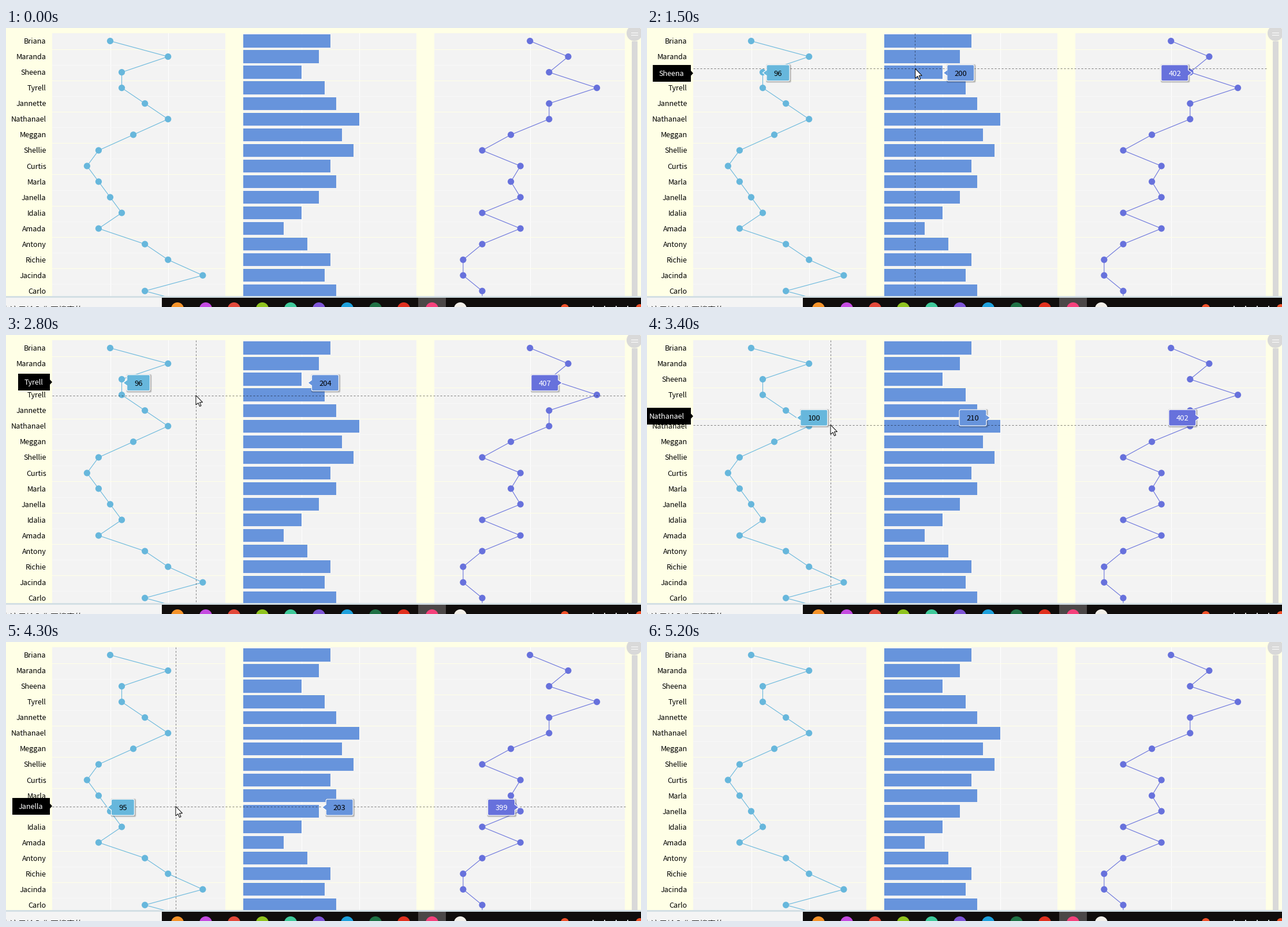
A matplotlib script for the animation above (5700 ms loop, 1100 px wide and 483 px high).

```python
import numpy as np
import matplotlib.pyplot as plt
from matplotlib.animation import FuncAnimation
from matplotlib.patches import Circle, FancyBboxPatch, Polygon, Rectangle

W, H, DPI = 1100, 483, 100
STEP, FRAMES = 100, 57
PX = 72 / DPI
TOP, BOTTOM, ROW = 9, 464, 27.05
FONT = "Noto Sans CJK JP"
CREAM = "#ffffe6"

NAMES = ("Briana Maranda Sheena Tyrell Jannette Nathanael Meggan Shellie Curtis "
         "Marla Janella Idalia Amada Antony Richie Jacinda Carlo").split()


class Panel:
    """One chart column: values grow rightwards from a base value."""

    def __init__(self, index, width, base, unit, grid, color, ink, offsets):
        self.x0 = 80 + 331 * index
        self.x1 = self.x0 + width
        self.color, self.ink = color, ink
        self.values = base + np.array(offsets)
        self.xs = self.x0 + 0.2 + unit * np.array(offsets)
        self.grid = np.arange(self.x0 + grid * unit, self.x1 - 50, grid * unit)


PANELS = (
    Panel(0, 300, 90, 20.05, 5, "#67b7dc", "black",
          [5, 10, 6, 6, 8, 10, 7, 4, 3, 4, 5, 6, 4, 8, 10, 13, 8, 13]),
    Panel(1, 300, 190, 10.04, 10, "#6794dc", "black",
          [15, 13, 10, 14, 16, 20, 17, 19, 15, 16, 13, 10, 7, 11, 15, 14, 16, 16]),
    Panel(2, 330, 390, 16.55, 10, "#6771dc", "white",
          [10, 14, 12, 17, 12, 12, 8, 5, 9, 8, 9, 5, 9, 5, 3, 3, 5, 5]),
)
YS = 22.5 + ROW * np.arange(len(NAMES) + 1)

# Key points of the pointer: time in ms, x, y
PATH = np.array([
    (100, 1084, 113), (900, 593, 107), (2000, 356, 39), (2100, 356, 39),
    (2750, 334, 85), (2800, 328, 104), (3220, 323, 112), (3300, 319, 150),
    (3400, 317, 155), (4150, 296, 282), (4300, 293, 284), (5000, 530, 200)])
SHOW_AT, HIDE_AT = 100, 5100

fig = plt.figure(figsize=(W / DPI, H / DPI), dpi=DPI, facecolor=CREAM)
ax = fig.add_axes([0, 0, 1, 1])
ax.set_xlim(0, W)
ax.set_ylim(H, 0)
ax.axis("off")


def rect(x0, y0, x1, y1, color, z=1):
    return ax.add_patch(Rectangle((x0, y0), x1 - x0, y1 - y0, fc=color, lw=0, zorder=z))


def disc(x, y, r, color, z=1):
    return ax.add_patch(Circle((x, y), r, fc=color, lw=0, zorder=z))


def line(x, y, color, z=2, width=1, **kw):
    return ax.plot(x, y, color=color, lw=width * PX, zorder=z, **kw)[0]


def label(x, y, text, color="black", ha="right", z=4, size=12.6):
    return ax.text(x, y + 4.6, text, color=color, ha=ha, va="baseline",
                   family=FONT, fontsize=size * PX, zorder=z)


def draw_chart():
    for panel in PANELS:
        rect(panel.x0, TOP, panel.x1, BOTTOM, "#f3f3f3")
        for x in np.floor(panel.grid) + 0.5:
            line([x, x], [TOP, BOTTOM], "white")
        for k in range(1, 17):
            y = round(TOP + ROW * k) + 0.5
            line([panel.x0, panel.x1], [y, y], CREAM if k % 2 else "#f8f8f8")
    left, bars, right = PANELS
    for x, y in zip(np.round(bars.xs), YS):
        rect(bars.x0, y - 11.2, x, y + 11.2, bars.color, 3)
    for panel in (left, right):
        line(panel.xs, YS, panel.color, 3, 1.1)
        for x, y in zip(panel.xs, YS):
            disc(x, y, 5.6, panel.color, 3)
    rect(1084, 23, 1094, BOTTOM, "#d9d9d9")
    disc(1088.5, 9, 13.5, "#d9d9d9", 2)
    for y in (7.5, 11.5):
        line([1083, 1094], [y, y], "white", 3)


def draw_taskbar():
    rect(0, BOTTOM, W, 467, "#d3dfe4", 5)
    rect(0, 467, 270, H, "#f4f4f4", 5)
    rect(270, 467, W, H, "#100d0c", 5)
    rect(714, 467, 762, H, "#4b4747", 5)
    label(-7, 488, "在这里输入你要搜索的", "#222222", "left", 6, 14)
    colors = ("#f5932a #c44be0 #e2483a #8fc31f #3fc99a #7d55d6 "
              "#1da0dc #1f7145 #e0301e #f5417c #f2efe9").split()
    for k, color in enumerate(colors):
        disc(297 + 49 * k, 486, 11, color, 6)
    for x in (968, 1098):
        disc(x, 485, 7, "#f0512a", 6)
    for x in range(1017, 1080, 20):
        rect(x - 1, 481, x + 1, H, "#dddddd", 6)


def pointer(t):
    return [np.interp(t, PATH[:, 0], PATH[:, axis]) for axis in (1, 2)]


def simulate(dt=10):
    """Tooltips chase the hovered row with an exponential ease."""
    states, tag_y, points = {}, None, None
    for t in range(SHOW_AT, HIDE_AT, dt):
        x, y = pointer(t)
        if x < 1073:
            row = int((y - TOP) // ROW)
            goal = np.array([(panel.xs[row], YS[row]) for panel in PANELS])
            if points is None:
                tag_y, points = YS[row], goal
            points = points + (goal - points) * (1 - np.exp(-dt / 100))
            tag_y += (YS[row] - tag_y) * (1 - np.exp(-dt / 115))
            states[t + dt] = row, tag_y, points
    return states


def draw_value(x, y, value, color, ink):
    side = -1 if x > 576 else 1
    width = 26 + 7 * len(str(value))
    edge = x + 6.5 * side
    x0 = min(edge, edge + side * width)
    box = dict(boxstyle="round,pad=0,rounding_size=2.5")
    art = [ax.add_patch(FancyBboxPatch(
        (x0 + 1 - grow, y - 13 - grow), width + 2 * grow, 28 + 2 * grow,
        fc="black", lw=0, alpha=0.15, zorder=8, **box)) for grow in (2, 1)]
    art.append(ax.add_patch(FancyBboxPatch((x0, y - 14), width, 28, fc=color, ec="white",
                                           lw=PX * 1.2, zorder=9, **box)))
    inner = edge + 0.8 * side
    art.append(ax.add_patch(Polygon([(inner, y - 5), (x, y), (inner, y + 5)],
                                    closed=True, fc=color, lw=0, zorder=10)))
    art.append(line([edge, x, edge], [y - 5, y, y + 5], "white", 10, 1.2))
    art.append(label(x0 + width / 2, y + 0.5, value, ink, "center", 11, 13))
    return art


def draw_tag(row, y):
    x1 = 75.5
    x0 = x1 - widths[row] - 22
    return [rect(x0, y - 14.5, x1, y + 14.5, "black", 9),
            ax.add_patch(Polygon([(x1 - 1, y - 6), (80, y), (x1 - 1, y + 6)],
                                 closed=True, fc="black", lw=0, zorder=9)),
            label(64.5, y, NAMES[row], "white", z=11)]


def draw_pointer(x, y):
    arrow = [(0, 0), (0, 16.5), (4, 13), (6.5, 19), (9, 18), (6.5, 12), (11.5, 12)]
    return ax.add_patch(Polygon(np.array(arrow) + (x + 1, y + 0.5), closed=True, fc="white",
                                ec="black", lw=PX, zorder=14))


def draw_crosshair(x, y):
    x, y = np.floor([x, y]) + 0.5
    style = dict(dashes=(3, 3), alpha=0.5)
    return [line([80, 1073], [y, y], "black", 7, **style),
            line([x, x], [TOP, BOTTOM], "black", 4.5, **style)]


def clear():
    while moving:
        moving.pop().remove()


def update(frame):
    clear()
    t = frame * STEP
    if not SHOW_AT <= t < HIDE_AT:
        return
    x, y = pointer(t)
    moving.append(draw_pointer(x, y))
    if t in states:
        row, tag_y, points = states[t]
        moving.extend(draw_crosshair(x, y) + draw_tag(row, tag_y))
        for panel, (px, py) in zip(PANELS, points):
            moving.extend(draw_value(px, py, panel.values[row], panel.color, panel.ink))


moving = []
states = simulate()
draw_chart()
draw_taskbar()
name_texts = [label(69.5, y, name) for name, y in zip(NAMES, YS)]
renderer = fig.canvas.get_renderer()
widths = [text.get_window_extent(renderer).width for text in name_texts]

animation = FuncAnimation(fig, update, frames=FRAMES, interval=STEP, init_func=clear,
                          repeat=True, repeat_delay=0, blit=False)
plt.show()
```
